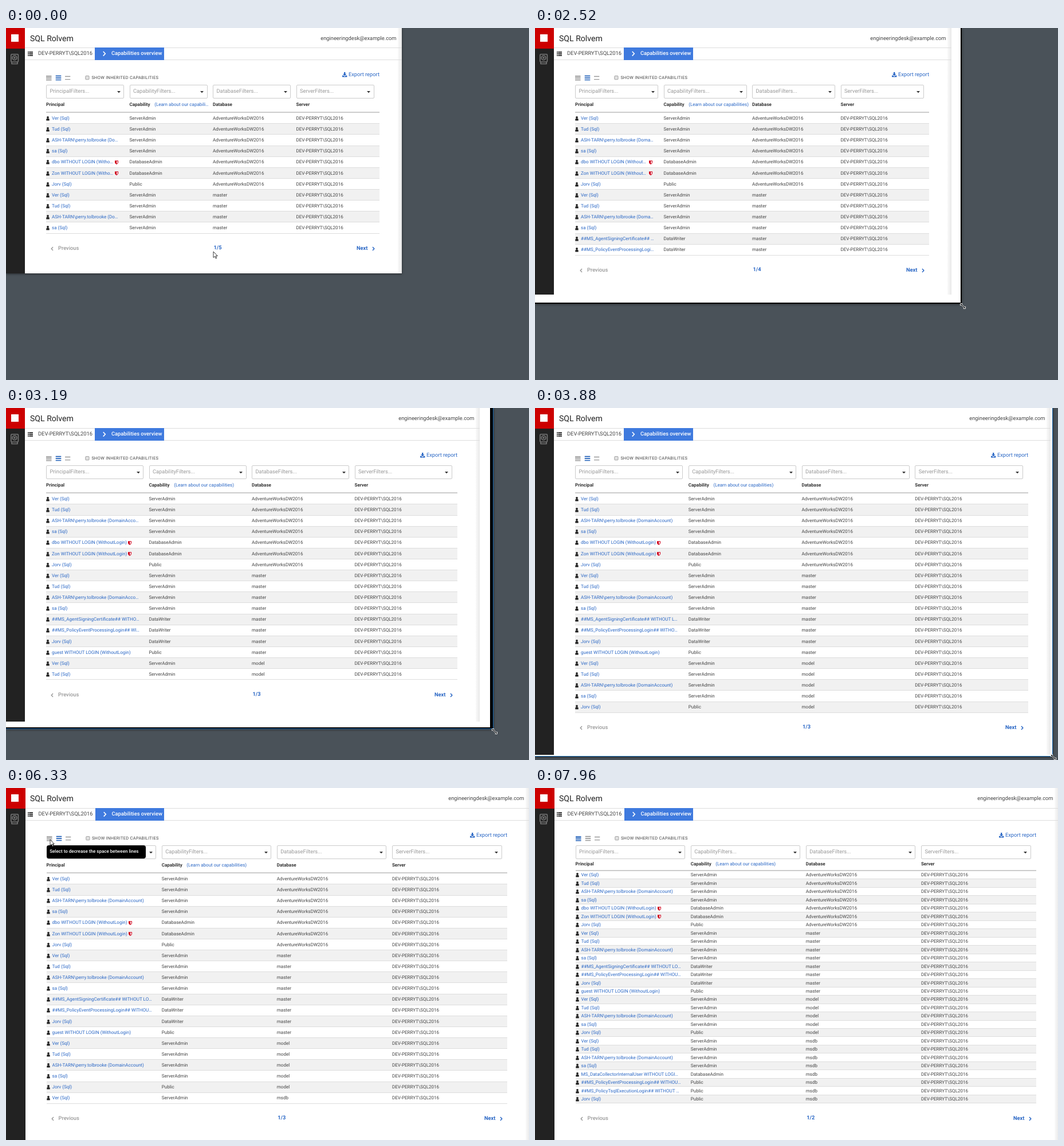
Animation, 913 px wide and 614 px high, one loop 8000 ms. Source, as an HTML page:

```html
<!DOCTYPE html>
<html lang="en">
<head>
<meta charset="utf-8">
<title>Capabilities overview</title>
<style>
html, body { margin: 0; width: 100%; height: 100%; overflow: hidden; background: #4a5259; }
body { position: relative; font: 8.06px/12px Roboto, sans-serif; color: #444; text-rendering: geometricPrecision; }
div, svg, .t { position: absolute; white-space: nowrap; }
svg { overflow: visible; }
.t, .big { line-height: 12px; }
.big { font-size: 9.3px; }
.link { color: #2a67c5; }
#win { left: 0; top: 0; background: #000; box-sizing: border-box; box-shadow: 0 1px 4px #0008; }
#white { left: 0; top: 0; background: #fff; }
#page { left: 0; top: 0; overflow: hidden; background: #fff; }
#side { left: 0; top: 0; height: 100%; background: #222; }
#brand { width: 100%; height: 36px; background: #c00; }
#brand div { left: 9px; top: 11px; width: 13px; height: 13px; background: #fff; }
#edge { right: 0; top: 0; width: 7px; height: 100%; background: linear-gradient(90deg, #fafafa, #e9e9e9); }
#crumbs { right: 0; height: 20px; border: solid #ddd; border-width: 1px 0; }
#tab { left: 122px; top: -1px; width: 120.5px; height: 22px; background: #3f7ade; }
#main { top: 0; }
.filter { top: 99px; height: 21.5px; border: 1px solid #ccc; border-radius: 2px; color: #999; }
.filter .t { left: 5.5px; top: 4.5px; }
.filter svg { right: 5.5px; top: 10px; }
.head { font-weight: 700; color: #333; display: flex; }
.head .link { position: static; font-weight: 400; margin-left: 7.5px; overflow: hidden; text-overflow: ellipsis; }
#rule { left: 0; width: 100%; height: 2.4px; background: #ccc; }
.row { left: 0; width: 100%; box-sizing: border-box; padding-top: 1.3px; border-bottom: 1px solid #ddd; display: grid; grid-template-columns: repeat(4, 25%); align-items: center; }
.row:nth-child(even) { background: #f1f1f1; }
.row span { position: static; }
.who { display: flex; align-items: center; min-width: 0; padding-right: 16.5px; }
.who svg { position: static; flex: none; }
.who .link { overflow: hidden; text-overflow: ellipsis; margin-left: 4px; }
.who .link + svg { margin: 0 3px 0 2px; }
#pager { left: 0; width: 100%; height: 12px; font-weight: 500; }
#tip { left: 70.5px; top: 99.5px; width: 173.5px; height: 23.5px; border-radius: 4px; background: #000; color: #fff; font-weight: 500; }
#tip::before { content: ""; position: absolute; left: 5px; top: -4px; border: solid transparent; border-width: 0 4px 4px; border-bottom-color: #000; }
</style>
</head>
<body>
<div id="win"><div id="white"></div></div>
<div id="page">
  <div id="edge"></div>
  <div id="side">
    <div id="brand"><div></div></div>
    <svg width="33" height="70" fill="none" stroke="#777" stroke-width="1.6">
      <rect x="8.8" y="45.8" width="12.6" height="13.4" rx="1.5"/>
      <circle cx="15" cy="52" r="3.8"/><circle cx="15" cy="52" r="1" fill="#777"/>
      <path d="M10 60v2.5h10V60"/>
    </svg>
  </div>
  <span class="t" style="left:42px;top:13px;font-size:14.1px;color:#222">SQL Rolvem</span>
  <span class="t big" style="right:9.5px;top:13px">engineeringdesk@example.com</span>
  <div id="crumbs">
    <svg style="left:4.5px;top:5.5px" width="9" height="8" fill="#444">
      <path d="M0 0h9v2.2H0zM0 2.9h9v2.2H0zM0 5.8h9V8H0z"/><path fill="#ddd" d="M1 .8h2v.7H1zM1 3.7h2v.7H1zM1 6.6h2v.7H1z"/>
    </svg>
    <span class="t big" style="left:23px;top:3.5px">DEV-PERRYT\SQL2016</span>
    <div id="tab">
      <svg width="20" height="22" fill="none" stroke="#fff" stroke-width="1.6"><path d="M14.7 7l3.6 3.8-3.6 3.8"/></svg>
      <span class="t big" style="left:29px;top:4.5px;color:#fff;font-weight:500">Capabilities overview</span>
    </div>
  </div>
  <div id="main">
    <svg width="50" height="95" fill="none">
      <path id="dense" d="M0 83.7h9.5M0 86h9.5M0 88.4h9.5M0 90.7h9.5" stroke-width="1.4"/>
      <path id="normal" d="M16.7 83.7h9.6M16.7 87.1h9.6M16.7 90.5h9.6" stroke-width="1.7"/>
      <path d="M33 84.5h9.3M33 89.7h9.3" stroke="#999" stroke-width="1.3"/>
      <rect x="68.8" y="83.6" width="6.2" height="6.2" rx=".8" fill="#e2e2e2" stroke="#999" stroke-width=".9"/>
    </svg>
    <span class="t" style="left:79.4px;top:80.8px;font-size:7.44px;letter-spacing:.31px">SHOW INHERITED CAPABILITIES</span>
    <span class="t big link" style="right:0;top:76.4px">Export report<svg style="left:-11px;top:.8px" width="9" height="9" fill="#2a67c5"><path d="M3 0h2.4v3.2h2L4.2 6.4 1 3.2h2zM0 5.7h2l2.2 2 2.2-2h2v2.8H0z"/></svg></span>
    <div id="filters"></div>
    <div id="heads"></div>
    <div id="rule"></div>
    <div id="rows" style="left:0;width:100%"></div>
    <div id="pager" class="big">
      <svg width="14" height="12" fill="none" stroke="#999" stroke-width="1.4"><path d="M12 3L9.2 6l2.8 3"/></svg>
      <span class="t" style="left:21px;color:#999">Previous</span>
      <span class="t link" id="count" style="left:calc(50% + 1.5px);top:-.8px;font-weight:700"></span>
      <span class="t link" style="right:20.5px;font-weight:700">Next</span>
      <svg style="right:8px" width="5" height="12" fill="none" stroke="#2a67c5" stroke-width="1.5"><path d="M1 3l2.8 3L1 9"/></svg>
    </div>
  </div>
</div>
<div id="tip"><span class="t" style="left:5.7px;top:5.6px">Select to decrease the space between lines</span></div>
<svg id="cursor" width="1" height="1">
  <path id="arrow" d="M0 0V10.5L2.5 8.2 4.2 12 5.8 11.3 4.2 7.6H7.3Z" fill="#fff" stroke="#222" stroke-width=".9"/>
  <path id="sizer" d="M-4.5-4.5h3.6l-1.2 1.2 5.4 5.4L4.5.9v3.6H.9l1.2-1.2-5.4-5.4L-4.5-.9Z" fill="#000" stroke="#fff" stroke-width=".9"/>
</svg>
<script>
const $ = id => document.getElementById(id);
const px = (el, box) => { for (const k in box) el.style[k] = box[k] + 'px'; };

// table content
const A = 'ServerAdmin', D = 'DatabaseAdmin', W = 'DataWriter', P = 'Public';
const noLogin = ' WITHOUT LOGIN (WithoutLogin)';
const admins = ['Ver (Sql)', 'Tud (Sql)', 'ASH-TARN\\perry.tolbrooke (DomainAccount)', 'sa (Sql)'].map(n => [n, A]);
const jorv = 'Jorv (Sql)', agent = '##MS_AgentSigningCertificate##', policy = '##MS_PolicyEventProcessingLogin##';
const extras = {
  AdventureWorksDW2016: [['dbo' + noLogin, D, 1], ['Zon' + noLogin, D, 1], [jorv, P]],
  master: [[agent + noLogin, W], [policy + noLogin, W], [jorv, W], ['guest' + noLogin, P]],
  model: [[jorv, P]],
  msdb: [['MS_DataCollectorInternalUser' + noLogin, D], [policy + noLogin, P],
    ['##MS_PolicyTsqlExecutionLogin##' + noLogin, P], [jorv, P]]
};
const person = '<svg width="6" height="8" fill="#222"><circle cx="3" cy="2" r="1.9"/><path d="M.3 7.6V5.4Q.3 4 1.7 4h2.6q1.4 0 1.4 1.4v2.2z"/></svg>';
const shield = '<svg width="6" height="7"><path d="M0 .3h6v3.2Q5.6 5.6 3 7 .4 5.6 0 3.5z" fill="#d0021b"/><path d="M3.2 1.3H5v2.2Q4.7 4.8 3.2 5.8z" fill="#fff"/></svg>';
for (const db in extras)
  for (const [name, role, warn] of [...admins, ...extras[db]])
    $('rows').innerHTML += `<div class="row"><span class="who">${person}<span class="link">${name}</span>${warn ? shield : ''}</span>
      <span>${role}</span><span>${db}</span><span>DEV-PERRYT\\SQL2016</span></div>`;
for (const name of ['Principal', 'Capability', 'Database', 'Server']) {
  $('filters').innerHTML += `<div class="filter"><span class="t big">${name}Filters...</span>
    <svg width="6" height="3.2"><path d="M0 0h6L3 3.2z" fill="#333"/></svg></div>`;
  $('heads').innerHTML += `<div class="head">${name}${name == 'Capability' ? '<span class="link">(Learn about our capabilities)</span>' : ''}</div>`;
}
const rows = [...$('rows').children], filters = [...$('filters').children], heads = [...$('heads').children];

const ticks = [0, 400, 530, 660, 790, 920, 1050, 1180, 1300, 1430, 1580,
  1980, 2120, 2250, 2380, 2520, 2670, 2800, 2940, 3070, 3190, 3340, 3470, 3610, 3740, 3880, 4000, 4120, 4270, 4400,
  5150, 5300, 5440, 5590, 5740, 5880, 6020, 6170, 6330, 6750, 6880, 7000, 7430, 7560, 7700, 7830, 7960];
const size = [[1850, 691, 428], [2380, 727, 465], [2520, 745, 481], [2940, 812, 536], [3070, 827, 547],
  [3190, 851, 560], [3740, 900, 605], [3880, 904, 608], [4000, 907, 612], [4120, 914, 619]];
const pointer = [[300, 362, 390], [650, 430, 360], [950, 540, 343], [1200, 650, 375], [1430, 686, 424],
  [1580, 905, 605], [5020, 905, 605], [5400, 700, 350], [5650, 330, 110], [5850, 140, 56], [6050, 76, 88], [6170, 76.5, 90],
  [7330, 76.5, 90], [7560, 250, 200], [7700, 520, 360], [7830, 820, 540], [7960, 920, 640]];

function at(keys, t) {
  const i = keys.findIndex(k => k[0] > t);
  if (i < 1) return keys.at(i).slice(1);
  const a = keys[i - 1], b = keys[i], f = (t - a[0]) / (b[0] - a[0]);
  return [1, 2].map(n => a[n] + (b[n] - a[n]) * f);
}

function layout(w, h, dense) {
  // a wide page sits slightly lower, a maximised one also slightly to the right
  const dy = w > 800 ? 1.1 : 0, dx = w > 910 ? .5 : 0;
  const width = w - 109 - dx, col = width / 4;
  const top = dense ? 143.8 : 148.2, step = dense ? 14.48 : 19.12;
  const n = Math.min(rows.length, Math.floor((h - top - dy - 67) / step));
  px($('page'), { width: w, height: h });
  px($('side'), { width: 33 + dx });
  px($('crumbs'), { top: 34 + dy, left: 33 + dx });
  px($('main'), { top: dy, left: 70 + dx, width });
  filters.forEach((el, i) => px(el, { left: i * col, width: col - 11.5 }));
  heads.forEach((el, i) => px(el, { left: i * col, width: col - 5, top: dense ? 125.8 : 127.8 }));
  px($('rule'), { top: top - 2.3 });
  rows.forEach((el, i) => {
    el.style.display = i < n ? '' : 'none';
    px(el, { top: top + i * step, height: step });
  });
  px($('pager'), { top: top + n * step + 20.4 });
  $('count').textContent = '1/' + Math.ceil(50 / n);
  $('dense').style.stroke = dense ? '#1f5fb8' : '#999';
  $('normal').style.stroke = dense ? '#999' : '#1f5fb8';
}

function draw(t) {
  const i = ticks.findLastIndex(k => k <= t), now = ticks[i];
  const [w, h] = at(size, now), [pw, ph] = at(size, ticks[Math.max(0, i - 1)]);
  // the page relayouts one refresh after the window grows
  const lag = now > 2700 ? .25 : .1;
  px($('win'), { width: w, height: h });
  px($('white'), { width: w - (w - pw) * lag, height: h - (h - ph) * lag });
  const blue = now > 2700 && now < 4120 ? '1px solid #1668b0' : '0';
  $('win').style.borderRight = $('win').style.borderBottom = blue;
  layout(pw, ph, now >= 6750);
  $('tip').style.display = now >= 6170 && now < 7430 ? '' : 'none';

  const sizing = now >= 1580 && now < 4400, off = now < 1980 ? [-.5, 1] : [2, 4];
  const [x, y] = sizing ? [Math.min(905, w + off[0]), Math.min(609, h + off[1])] : at(pointer, now);
  px($('cursor'), { left: x, top: y });
  $('arrow').style.display = sizing ? 'none' : '';
  $('sizer').style.display = sizing ? '' : 'none';
}

const start = performance.now();
(function loop() {
  draw((performance.now() - start) % 8000);
  requestAnimationFrame(loop);
})();
</script>
</body>
</html>
```
